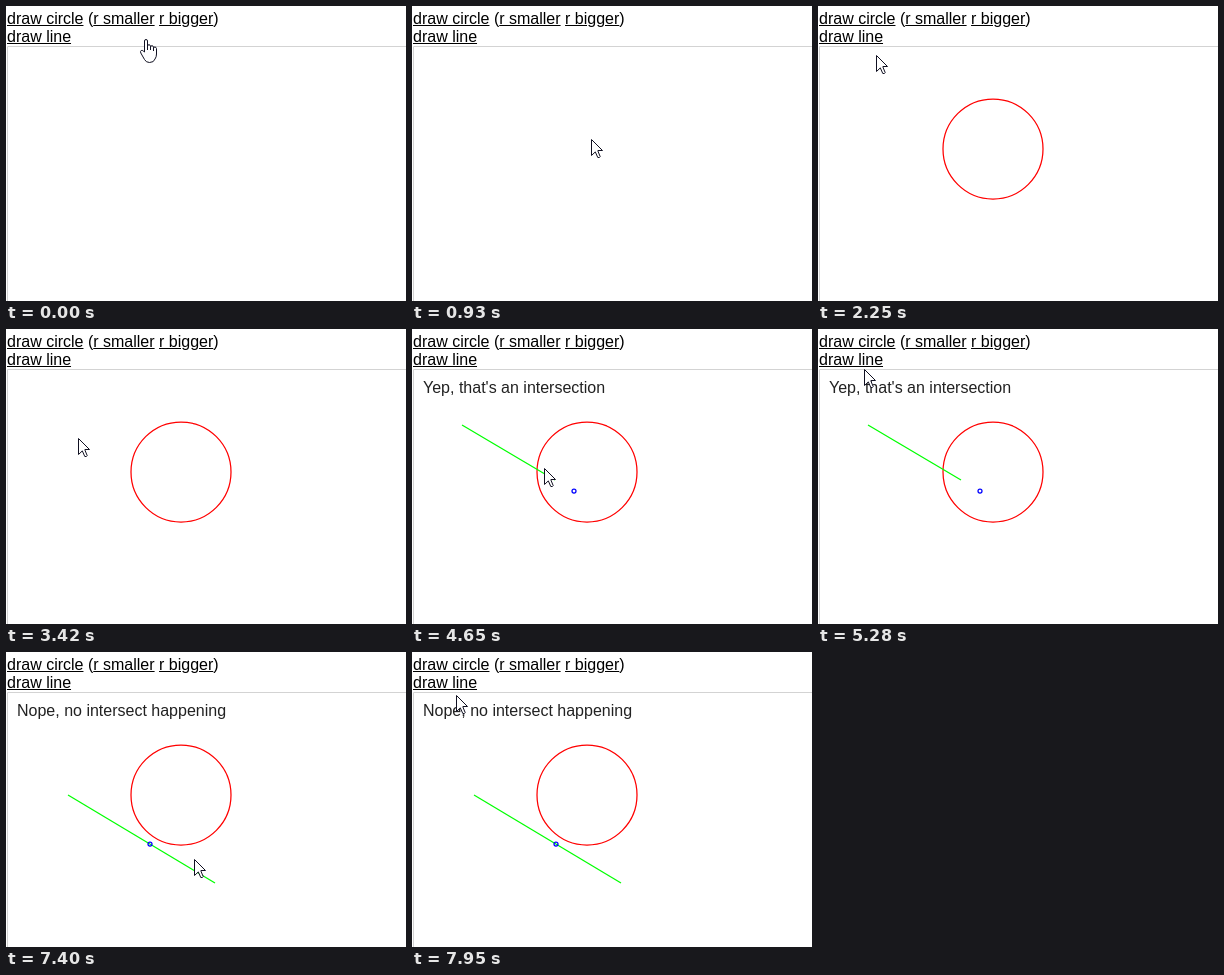
These frames come from a looping animation (400x295 px, 8000 ms). An HTML page:

```html
<!DOCTYPE html>
<html lang="en">
<head>
<meta charset="utf-8">
<title>Circle and line intersection</title>
<style>
  html, body { margin: 0; width: 100%; height: 100%; overflow: hidden; background: #fff; }
  body, text { font: 16px/18px "Liberation Sans", Arial, sans-serif; }
  header { position: absolute; left: 1px; top: 4px; color: #000; white-space: nowrap; }
  svg { position: absolute; left: 0; top: 0; }
  #shapes { fill: none; stroke-width: 1.25; }
</style>
</head>
<body>
<header><u>draw circle</u> (<u>r smaller</u> <u>r bigger</u>)<br><u>draw line</u></header>
<svg width="400" height="295" viewBox="0 0 400 295">
  <path d="M1.5 295V40.5H400" fill="none" stroke="lightgray"/>
  <text id="message" x="11" y="64" fill="#222"></text>
  <g id="shapes">
    <circle id="circle" cx="175" cy="143" r="50" stroke="#f00"/>
    <path id="line" stroke="#0f0"/>
    <circle id="dot" r="2" stroke="#00f"/>
  </g>
  <g id="cursor" fill="#fff" stroke="#112" stroke-linejoin="round">
    <path id="arrow" d="M.5 .5V16.5L4.3 12.9L6.8 18.5H8.4L9.2 17.6L6.9 12V11.5H11.5Z"/>
    <g id="hand" transform="translate(-6 0)">
      <path d="M4.5 13V2Q4.5 .5 6 .5T7.5 2V7Q7.8 5.7 9 5.7T10.5 7.2V8Q10.8 6.7 12 6.7T13.5 8.2V9Q13.8 7.9 15 8T16.5 9.5V15Q16.5 18 15 20Q14 23.5 9.5 23.5Q6 23.5 4.5 20.5L.8 14Q0 12.2 1.2 11.5Q2.3 11 3.2 12Z"/>
      <path d="M7.5 7V11M10.5 8V11M13.5 9V12" fill="none"/>
    </g>
  </g>
</svg>
<script>
const LOOP = 8000;
const TICK = 76; // the pointer advances once per tick
const START = { x: 140, y: 33 };

const MOVES = [
  { from: 70, to: 380, x: 47, y: 10 },      // to "draw circle"
  { from: 700, to: 1160, x: 202, y: 155 },  // past the centre
  { from: 1240, to: 1380, x: 174, y: 142 }, // back to the centre
  { from: 1950, to: 2560, x: 34, y: 30 },   // to "draw line"
  { from: 2790, to: 3020, x: 49, y: 95 },   // first line
  { from: 3420, to: 3720, x: 142, y: 150 },
  { from: 4650, to: 5280, x: 46, y: 40 },   // to "draw line"
  { from: 5360, to: 5430, x: 44, y: 33 },
  { from: 5680, to: 5930, x: 61, y: 142 },  // second line
  { from: 6230, to: 6690, x: 208, y: 230 },
  { from: 7400, to: 7950, x: 44, y: 43 },   // back towards "draw line"
];

const CIRCLE_AT = 1630;
const RESULTS = [
  { at: 3970, text: "Yep, that's an intersection", line: "M50 96L143 151", dot: [162, 162] },
  { at: 6770, text: "Nope, no intersect happening", line: "M62 143L209 231", dot: [144, 192] },
];

const el = id => document.getElementById(id);
const show = (id, on) => el(id).setAttribute("display", on ? "inline" : "none");
const links = [...document.querySelectorAll("u")].map(u => u.getBoundingClientRect());

// Soft start, long settling end
const ease = u => 1 - (1 - u ** 1.6) ** 3.6;

function pointerAt(t) {
  let { x, y } = START;
  for (const move of MOVES) {
    if (t < move.from) break;
    const steps = Math.round((move.to - move.from) / TICK) + 1;
    const step = Math.floor((t - move.from) / TICK + 0.06) + 1;
    const u = ease(Math.min(1, step / steps));
    x += (move.x - x) * u;
    y += (move.y - y) * u;
  }
  return [Math.round(x), Math.round(y)];
}

function draw(t) {
  const [x, y] = pointerAt(t);
  const overLink = links.some(r => x >= r.left && x < r.right && y >= r.top && y < r.bottom);
  const isHand = overLink || t < MOVES[0].from;
  el("cursor").setAttribute("transform", `translate(${x} ${y})`);
  show("hand", isHand);
  show("arrow", !isHand);

  show("circle", t >= CIRCLE_AT);
  const result = RESULTS.filter(r => t >= r.at).pop();
  for (const id of ["message", "line", "dot"]) show(id, result);
  if (result) {
    el("message").textContent = result.text;
    el("line").setAttribute("d", result.line);
    el("dot").setAttribute("cx", result.dot[0]);
    el("dot").setAttribute("cy", result.dot[1]);
  }
}

const begin = performance.now();
function tick() {
  draw((performance.now() - begin) % LOOP);
  requestAnimationFrame(tick);
}
tick();
</script>
</body>
</html>
```
